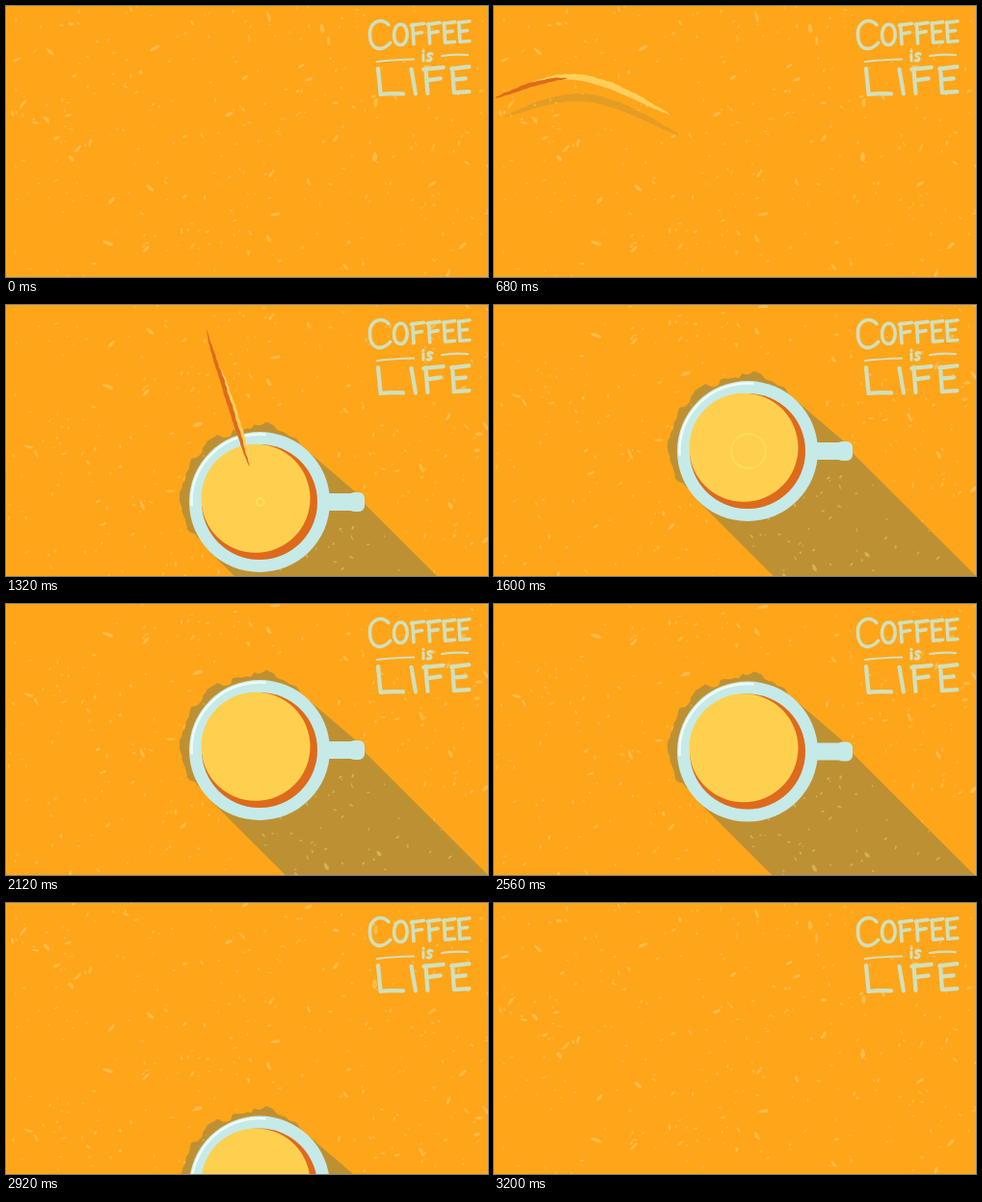
Recreate the animation shown at these times as an HTML page with a canvas. Size 500 by 282 pixels, loop 3840 ms.

```html
<!DOCTYPE html>
<html lang="en">
<head>
<meta charset="utf-8">
<title>Coffee is life</title>
<style>
html, body { margin: 0; width: 100%; height: 100%; overflow: hidden; background: #ffa51a; }
canvas { display: block; width: 100vw; height: 100vh; }
</style>
</head>
<body>
<canvas width="500" height="282" role="img" aria-label="Coffee is life"></canvas>
<script>
const ctx = document.querySelector('canvas').getContext('2d');
const LOOP = 3840, SCROLL = 215, TAU = 2 * Math.PI;
const CUP = { x: 263, y: 367, r: 73 };
const ORANGE = '#ffa51a', SHADE = '#bd9133', CHINA = '#c6eae8';
const DARK = '#de6a1b', LIGHT = '#ffcf5c', COFFEE = '#ffd04f';

const clamp = v => Math.min(1, Math.max(0, v));
const phase = (t, from, to) => clamp((t - from) / (to - from));
const easeInOut = p => p < .5 ? 2 * p * p : 1 - 2 * (1 - p) ** 2;
const easeOut = p => 1 - (1 - p) ** 2;

let seed = 11;
const rand = (lo = 0, hi = 1) => {
  seed = (seed * 16807) % 2147483647;
  return lo + (hi - lo) * seed / 2147483647;
};

// Paper flecks, scattered over the whole scrolling ground: many small, few large
const flecks = new Path2D();
function addFleck(x, y, len, thick, angle) {
  const c = Math.cos(angle), s = Math.sin(angle), corners = 7;
  for (let i = 0; i < corners; i++) {
    const a = i / corners * TAU, k = rand(.6, 1.1) / 2;
    const u = Math.cos(a) * len * k, v = Math.sin(a) * thick * k;
    flecks[i ? 'lineTo' : 'moveTo'](x + u * c - v * s, y + u * s + v * c);
  }
  flecks.closePath();
}
for (let i = 0; i < 560; i++) {
  const size = rand() ** 9;
  addFleck(rand(0, 500), rand(0, 500), rand(2, 5.5) + 10 * size, rand(1.2, 2.6) + 3 * size, rand(-2.4, .4));
}

// Hand lettering: glyphs in a unit box, each with its width-to-height ratio
const glyphs = {
  C: [.72, 'M.92 .15C.55 -.12 0 .05 .02 .5C.04 1.05 .6 1.1 1 .78'],
  O: [.68, 'M.5 0C-.12 .05 -.12 1 .5 1C1.12 1 1.12 0 .5 0'],
  F: [.6, 'M.1 .05L.2 1M0 .08L1 0M.15 .5L.85 .43'],
  E: [.54, 'M.05 .05L.15 1L1 .96M0 .08L1 0M.1 .5L.8 .45'],
  L: [.77, 'M0 0L.1 1Q.5 .95 1 .98'],
  I: [.13, 'M0 .05L1 1'],
  i: [.2, 'M.4 0L.5 .02M.4 .38L.5 1'],
  s: [.55, 'M1 .3C.3 .1 0 .45 .5 .6C1.1 .75 .8 1.08 .1 .97']
};
function word(text, x, y, height, gap, rise = 0, stretch = 1) {
  const path = new Path2D();
  for (const ch of text) {
    const [ratio, d] = glyphs[ch];
    const width = ratio * height * stretch;
    path.addPath(new Path2D(d), new DOMMatrix([width, 0, 0, height, x, y]));
    x += width + gap;
    y -= rise;
  }
  return path;
}
const lettering = [
  [3.6, word('C', 377, 15, 30, 0)],
  [3.6, word('OFFEE', 402, 19, 21.5, 3.8, .8)],
  [3, word('is', 432, 47, 10, 2.5)],
  [2.2, new Path2D('M385 58Q400 56 423 55.5M452 52Q465 50 479 51')],
  [4.2, word('LIFE', 386, 65, 27, 8.5, .6, 1.25)]
];

// Route of the poured coffee, sampled once per pixel with left-hand normals
const route = document.createElementNS('http://www.w3.org/2000/svg', 'path');
route.setAttribute('d', `M0 95C30 83 52 74 80 74C115 76 150 97 177 111
  C195 120 215 124 240 123C270 122 316 115 316 66C316 28 292 5 258 5
  C225 5 200 38 198 76C198 140 210 200 222 229C232 262 243 296 254 331`);
const END = Math.floor(route.getTotalLength());
const LOOP_END = 600;
const spots = Array.from({ length: END + 1 }, (_, s) => {
  const p = route.getPointAtLength(s);
  const a = route.getPointAtLength(Math.max(0, s - 1));
  const b = route.getPointAtLength(s + 1);
  const d = Math.hypot(b.x - a.x, b.y - a.y) || 1;
  return { x: p.x, y: p.y, nx: (b.y - a.y) / d, ny: (a.x - b.x) / d };
});

function fillShape(points, color) {
  ctx.fillStyle = color;
  ctx.beginPath();
  points.forEach(p => ctx.lineTo(...p));
  ctx.fill();
}

function ribbon(from, to, width, shift, color) {
  from = Math.max(0, from);
  to = Math.min(END, to);
  if (to - from < 2) return;
  const left = [], right = [];
  for (let s = Math.ceil(from); s <= to; s += 2) {
    const { x, y, nx, ny } = spots[s];
    const half = width / 2 * Math.sin(Math.PI * (s - from) / (to - from)) ** .6;
    const wobble = .3 * Math.sin(s * .21) + .25 * Math.sin(s * .67);
    const l = shift + half + wobble, r = shift - half + wobble / 2;
    left.push([x + nx * l, y + ny * l]);
    right.unshift([x + nx * r, y + ny * r]);
  }
  fillShape(left.concat(right), color);
}

function disc(x, y, r, color) {
  ctx.fillStyle = color;
  ctx.beginPath();
  ctx.arc(x, y, r, 0, TAU);
  ctx.fill();
}

function ring(x, y, r, width, color, from = 0, to = TAU) {
  ctx.strokeStyle = color;
  ctx.lineWidth = width;
  ctx.beginPath();
  ctx.arc(x, y, r, from, to);
  ctx.stroke();
}

// Ragged edge of the cup's shadow, from upper right round to lower left
const RAGS = 56;
let rag = 0;
const raggedRim = Array.from({ length: RAGS + 1 }, (_, i) => {
  const q = i / RAGS, angle = -.95 - q * 2.75;
  if (i % 3 === 0) rag = rand(3, 12);
  const r = CUP.r + (rag + rand(-1.5, 1.5)) * Math.sin(Math.PI * q) ** .4;
  return [r * Math.cos(angle), r * Math.sin(angle)];
});

function cupShadow() {
  const edge = CUP.r * Math.SQRT1_2, far = 400;
  fillShape([...raggedRim, [0, 0]], SHADE);
  fillShape([[edge, -edge], [107, -4], [109, 2], [109 + far, 2 + far],
    [far - edge, far + edge], [-edge, edge]], SHADE);
}

function cup(t) {
  ctx.fillStyle = CHINA;
  ctx.beginPath();
  ctx.roundRect(60, -9, 48, 18, 5);
  ctx.roundRect(92, -10, 17, 20, 6);
  ctx.fill();
  disc(0, 0, CUP.r, CHINA);
  ring(0, 0, CUP.r - 2.5, 2.5, '#effbf8', Math.PI * .98, Math.PI * 1.53);
  disc(0, 0, 60, '#a4c8c8');

  const fill = easeOut(phase(t, 1160, 1310));
  disc(0, 0, 60 * fill, DARK);
  disc(-4 * fill, -3.7 * fill, 56.5 * fill, COFFEE);

  const ripple = phase(t, 1260, 2110);
  if (ripple > 0 && ripple < 1) {
    ctx.globalAlpha = 1 - ripple * .7;
    ring(1, 0, 28 * easeOut(ripple), 1.3, '#ffe566');
    ctx.globalAlpha = 1;
  }
}

function at(x, y, paint) {
  ctx.save();
  ctx.translate(x, y);
  paint();
  ctx.restore();
}

function pour(head, tail) {
  ribbon(tail + 40, head, 7, .5, LIGHT);
  ribbon(tail, head - 114, 4.6, -1.4, DARK);
  if (tail > 120 && tail < 400) {
    for (let i = 0; i < 6; i++) {
      const p = spots[Math.round(tail + 22 + i * 8)];
      const away = 9 + 3 * Math.sin(i * 5);
      disc(p.x - p.nx * away, p.y - p.ny * away, .7 + .5 * (i % 2), DARK);
    }
  }
}

function draw(t) {
  const scroll = SCROLL * (easeInOut(phase(t, 872, 1564)) - easeInOut(phase(t, 2520, 3200)));
  const u = Math.max(0, t - 350), v = Math.max(0, t - 680);
  const head = .37 * u + .00065 * u * u;
  const tail = .00163 * v * v;

  ctx.fillStyle = ORANGE;
  ctx.fillRect(0, 0, 500, 282);
  at(0, -scroll, () => {
    at(CUP.x, CUP.y, cupShadow);
    at(10, 21, () => ribbon(tail, Math.min(head, LOOP_END), 8, 0, 'rgba(189,145,51,.42)'));
    ctx.fillStyle = 'rgba(255,220,140,.4)';
    ctx.fill(flecks);
    at(CUP.x, CUP.y, () => cup(t));
    pour(head, tail);
  });

  ctx.strokeStyle = '#d0e0bd';
  ctx.lineCap = ctx.lineJoin = 'round';
  for (const [width, path] of lettering) {
    ctx.lineWidth = width;
    ctx.stroke(path);
  }
  ctx.lineCap = 'butt';
}

const start = performance.now();
function frame() {
  draw((performance.now() - start) % LOOP);
  requestAnimationFrame(frame);
}
frame();
</script>
</body>
</html>
```
